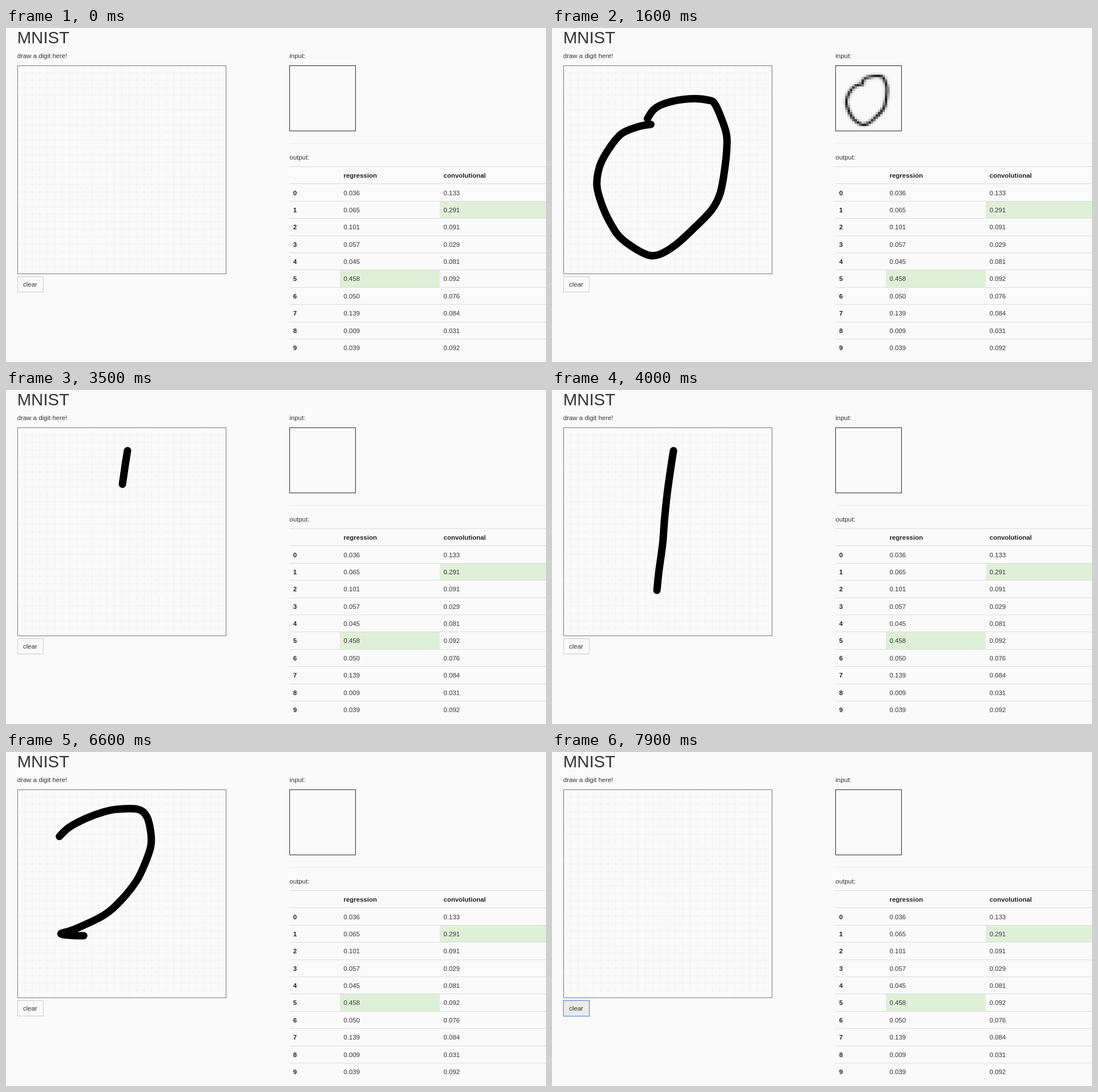
An HTML page with a canvas that plays this animation: 951 px wide and 589 px high, repeating every 8000 ms.

```html
<!DOCTYPE html>
<html lang="en">
<head>
<meta charset="utf-8">
<title>MNIST</title>
<style>
  html, body { margin: 0; width: 100%; height: 100%; overflow: hidden; background: #fafafa; }
  svg { position: absolute; left: 0; top: 0; }
  text, #clear { font: 11.48px "Liberation Sans", Arial, sans-serif; fill: #333; color: #333; }
  .title { font-size: 29.5px; }
  .bold { font-weight: bold; fill: #222; }
  #input { position: absolute; left: 500px; top: 66.3px; width: 114.7px; height: 114.7px; }
  #clear {
    position: absolute; left: 20px; top: 438px; width: 46px; height: 28px;
    box-sizing: border-box; border: 1px solid #ccc; background: #fafafa;
    line-height: 26px; text-align: center; text-indent: -1px;
  }
  #clear.hover, #clear.press, #clear.focus { background: #ebebeb; border-color: #adadad; }
  #clear.press { box-shadow: inset 0 2.5px 4px rgba(0, 0, 0, .125); }
  #clear.focus { border-color: #7ba0dd; box-shadow: 0 0 0 .6px #7ba0dd; }
</style>
</head>
<body>
<svg width="951" height="589">
  <text class="title" x="19.8" y="27">MNIST</text>
  <text x="19.8" y="53.3">draw a digit here!</text>
  <text x="499.3" y="53.3">input:</text>
  <text x="499.3" y="232.3">output:</text>
  <path d="M499 203.5H951" stroke="#f0f0f0"/>
  <g id="grid"></g>
  <path id="sketch" pathLength="1" fill="none" stroke="#000" stroke-width="13.1"
    stroke-linecap="round" stroke-linejoin="round"/>
  <rect x="20.5" y="66.5" width="367" height="367" fill="none" stroke="#777"/>
  <g id="table"></g>
</svg>
<canvas id="input" width="140" height="140"></canvas>
<svg width="951" height="589">
  <rect x="499.5" y="66.5" width="116" height="115" fill="none" stroke="#2a2a2a"/>
</svg>
<div id="clear">clear</div>
<script>
const LOOP = 8000, STEP = 100, CELLS = 28, CELL = 13.14;
const $ = id => document.getElementById(id);

const IDLE = [
  '.036 .065 .101 .057 .045 .458 .050 .139 .009 .039',
  '.133 .291 .091 .029 .081 .092 .076 .084 .031 .092'
].map(line => line.split(' '));

// scores lists only the digits that are not zero
const ROUNDS = [
  {
    begin: 600, steps: 10, ease: 1.26, hover: 2500, press: 2600,
    points: '174,170 152,174 123,186 103,209 85,241 79,277 88,312 105,348 124,373 163,398 187,400 ' +
      '217,383 249,354 281,321 296,292 304,250 308,208 306,182 288,136 274,127 240,125 202,132 180,143 168,160',
    scores: [{ 0: '.003', 2: '.005', 3: '.648', 5: '.335', 7: '.007', 8: '.002' },
             { 0: '.947', 2: '.023', 3: '.024', 9: '.006' }]
  },
  {
    begin: 3500, steps: 7, ease: 1.72, hover: 4900, press: 5100,
    points: '214,107 210,132 203,182 198,230 195,270 188,322 184,362',
    scores: [{ 1: '.846', 3: '.038', 5: '.034', 8: '.036' }, { 1: '.998' }]
  },
  {
    begin: 5800, steps: 11, ease: .97, hover: 7600, press: 7800,
    points: '94,149 111,133 141,117 171,106 195,101 232,101 248,114 255,142 255,166 245,196 230,227 ' +
      '203,261 172,288 122,312 97,321 137,324 255,320',
    scores: [{ 2: '.807', 3: '.124', 8: '.019' }, { 2: '.985', 3: '.012' }]
  }
];

function add(parent, tag, attrs, text = '') {
  const node = document.createElementNS('http://www.w3.org/2000/svg', tag);
  for (const key in attrs) node.setAttribute(key, attrs[key]);
  node.textContent = text;
  return parent.appendChild(node);
}

function buildGrid() {
  let d = '';
  for (let i = 1; i < CELLS; i++) {
    const at = i * 13.13;
    d += `M20 ${66 + at}h367.5M${20 + at} 66v367.5`;
  }
  add($('grid'), 'path', { d, stroke: '#f6f6f6' });
  add($('grid'), 'path', { d, stroke: '#efefef', 'stroke-dasharray': '3 10.13', 'stroke-dashoffset': 1.5 });
}

const COLUMNS = [{ name: 'regression', x: 588, width: 176 }, { name: 'convolutional', x: 764, width: 187 }];
const lineY = i => Math.round(244 + 30.4 * i) + .5;
const textY = i => 264.2 + 30.37 * i;

function buildTable() {
  const table = $('table');
  for (const col of COLUMNS) {
    col.mark = add(table, 'rect', { x: col.x, width: col.width, height: 30, fill: '#dff0d8' });
    add(table, 'text', { x: col.x + 6.5, y: textY(0), class: 'bold' }, col.name);
    col.cells = IDLE[0].map((_, i) => add(table, 'text', { x: col.x + 6.5, y: textY(i + 1) }));
  }
  for (let i = 0; i <= 10; i++) {
    add(table, 'path', { d: `M499 ${lineY(i)}H951`, stroke: '#ddd' });
    if (i) add(table, 'text', { x: 505.7, y: textY(i), class: 'bold' }, i - 1);
  }
}

function showScores(scores) {
  COLUMNS.forEach((col, c) => {
    const values = col.cells.map((_, i) => scores[c][i] || '.000');
    const best = values.indexOf([...values].sort().pop());
    values.forEach((v, i) => { col.cells[i].textContent = '0' + v; });
    col.mark.setAttribute('y', lineY(best + 1) + .5);
  });
}

// Catmull-Rom curve through the points, as Bezier path data
function curve(points) {
  const p = points.split(' ').map(pair => pair.split(',').map(Number));
  const tangent = i => [0, 1].map(k => ((p[i + 1] || p[i])[k] - (p[i - 1] || p[i])[k]) / 6);
  let d = 'M' + p[0];
  for (let i = 1; i < p.length; i++) {
    const from = tangent(i - 1), to = tangent(i);
    d += `C${p[i - 1].map((v, k) => v + from[k])} ${p[i].map((v, k) => v - to[k])} ${p[i]}`;
  }
  return d;
}

function smallCanvas() {
  const canvas = document.createElement('canvas');
  canvas.width = canvas.height = CELLS;
  return canvas;
}

// Reduces a drawn path to 28 x 28 gray cells, slightly softened
function sample(d) {
  const raw = smallCanvas(), soft = smallCanvas();
  const pen = raw.getContext('2d');
  pen.scale(1 / CELL, 1 / CELL);
  pen.translate(-20, -66);
  pen.lineWidth = 15;
  pen.lineCap = pen.lineJoin = 'round';
  pen.stroke(new Path2D(d));
  const mix = soft.getContext('2d'), weight = [.06, .88, .06];
  mix.globalCompositeOperation = 'lighter';
  for (let dy = -1; dy <= 1; dy++) {
    for (let dx = -1; dx <= 1; dx++) {
      mix.globalAlpha = weight[dx + 1] * weight[dy + 1];
      mix.drawImage(raw, dx, dy);
    }
  }
  return soft;
}

function showInput(image) {
  const ctx = $('input').getContext('2d');
  ctx.clearRect(0, 0, 140, 140);
  ctx.imageSmoothingEnabled = false;
  if (image) ctx.drawImage(image, 0, 0, 140, 140);
}

function showSketch(round, t) {
  const done = Math.min(1, ((t - round.begin) / STEP + 1) / round.steps);
  const length = 1 - (1 - done) ** round.ease;
  $('sketch').setAttribute('d', round.d);
  $('sketch').setAttribute('stroke-dasharray', `${length} 2`);
}

function buttonState(round, t) {
  if (!round || t < round.hover) return '';
  if (t < round.press) return 'hover';
  return t < round.press + STEP ? 'press' : 'focus';
}

function show(t) {
  const round = ROUNDS.filter(r => r.begin <= t).pop();
  const state = buttonState(round, t);
  const drawn = round && state !== 'focus';
  const input = round && round.begin + round.steps * STEP;
  if (drawn) showSketch(round, t);
  $('sketch').style.display = drawn ? '' : 'none';
  showInput(drawn && t >= input && round.image);
  showScores(drawn && t >= input + STEP ? round.scores : IDLE);
  $('clear').className = state;
}

buildGrid();
buildTable();
for (const round of ROUNDS) {
  round.d = curve(round.points);
  round.image = sample(round.d);
}

const start = performance.now();
let last = -1;
function tick() {
  const t = Math.floor(Math.max(0, performance.now() - start) % LOOP / STEP) * STEP;
  if (t !== last) show(last = t);
  requestAnimationFrame(tick);
}
tick();
</script>
</body>
</html>
```
